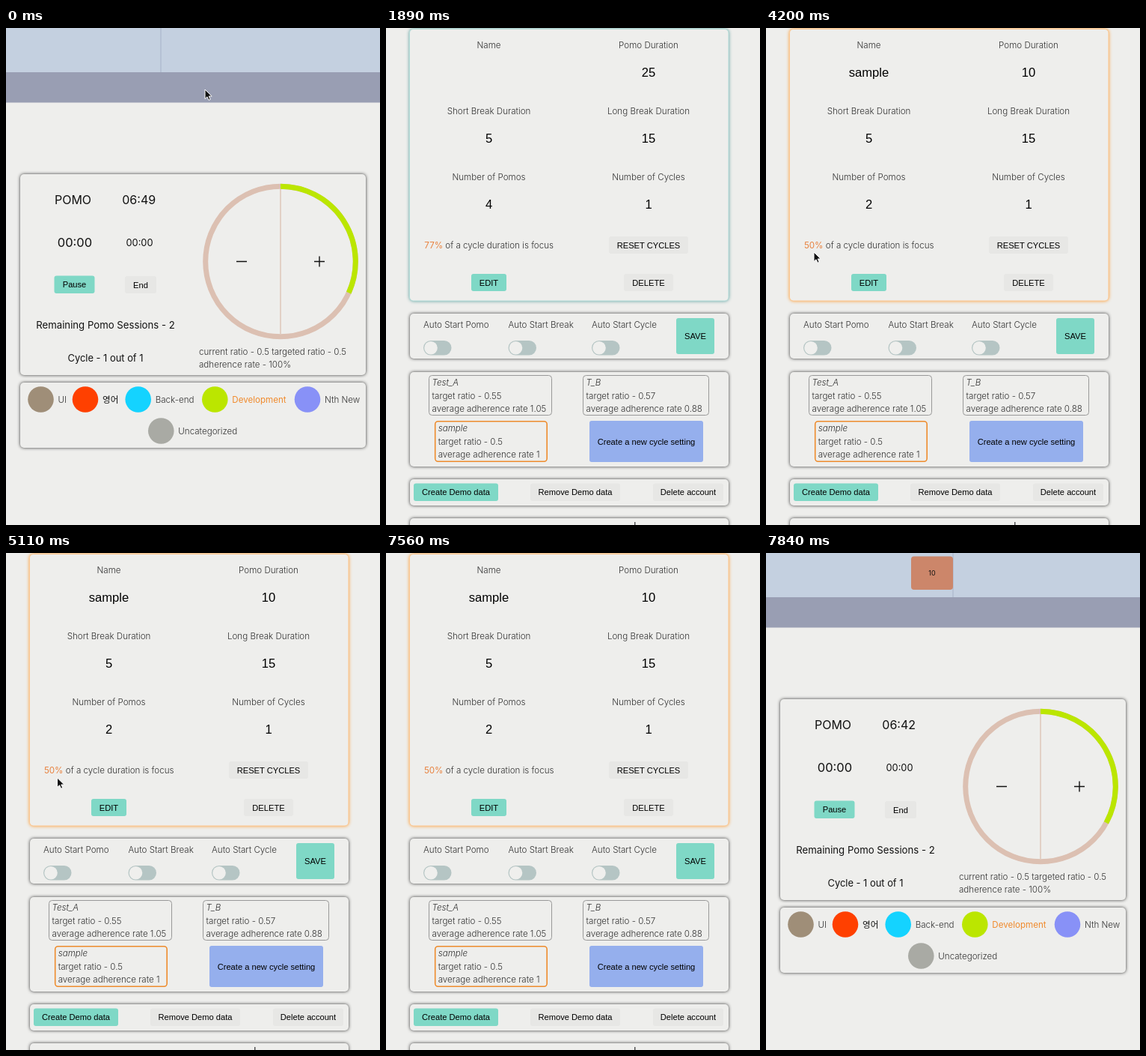
These frames come from a looping animation (500x663 px, 8000 ms). An HTML page:

```html
<!DOCTYPE html>
<html lang="en">
<head>
<meta charset="utf-8">
<title>Pomodoro timer</title>
<style>
  html, body { margin: 0; width: 100%; height: 100%; overflow: hidden; background: #eeeeec; }
  svg { display: block; width: 100%; height: 100%; }
  text { font-family: Inter, "Noto Sans CJK KR", sans-serif; font-weight: 300; fill: #333; white-space: pre; }
  .bold { font-weight: 400; fill: #111; }
  .ui { font-family: "Liberation Sans", Arial, sans-serif; font-weight: 400; fill: #000; }
  .name { font-style: italic; }
  .accent { font-weight: 400; fill: #f08a2c; }
  .share { font-weight: 400; fill: #e8823f; }
  .card { fill: #eeeeec; filter: drop-shadow(0 0 2px #333); }
  .fresh { stroke: #b4dcd8; filter: drop-shadow(0 0 2px #5f9f9f); }
  .loaded { stroke: #fbc894; filter: drop-shadow(0 0 2px #fba23f); }
  .box { fill: none; stroke: #999; }
  .chosen { stroke: #ee8c2d; stroke-width: 1.6; }
</style>
</head>
<body>
<svg id="stage" viewBox="0 0 500 663" preserveAspectRatio="none">
  <g id="home"></g>
  <g id="settings"></g>
  <path id="cursor" d="M0 0V12.5L3 9.8L5 14.3L7.2 13.3L5.2 9H9.2Z" fill="#111" stroke="#fff" stroke-width="1"/>
</svg>
<script>
const LOOP = 8000, TICK = 70;
const TEAL = '#7fd8c6', PALE = '#e7e7e5';
const $ = id => document.getElementById(id);

// y is the vertical middle of the capitals
const text = (x, y, str, { size = 11.6, cls = '', anchor = 'middle', id = '' } = {}) =>
  `<text id="${id}" class="${cls}" x="${x}" y="${y + size * 0.36}" font-size="${size}" text-anchor="${anchor}">${str}</text>`;
const left = (x, y, str, cls = '') => text(x, y, str, { cls, anchor: 'start' });
const bold = (x, y, str, size, id) => text(x, y, str, { size, id, cls: 'bold' });
const rect = (x0, y0, x1, y1, attrs, r = 4) =>
  `<rect x="${x0}" y="${y0}" width="${x1 - x0}" height="${y1 - y0}" rx="${r}" ${attrs}/>`;
const card = (x0, y0, x1, y1, id = '') => rect(x0, y0, x1, y1, `class="card" id="${id}"`, 5);
const button = (x0, y0, x1, y1, label, fill = PALE) =>
  rect(x0, y0, x1, y1, `fill="${fill}"`, 3) +
  text((x0 + x1) / 2, (y0 + y1) / 2, label, { size: 11.15, cls: 'ui' });
const line = (d, color, width) => `<path d="${d}" fill="none" stroke="${color}" stroke-width="${width}"/>`;
const tag = (x, y, color, label, cls) =>
  `<circle cx="${x}" cy="${y}" r="17.3" fill="${color}"/>` + left(x + 23, y, label, cls);
const field = (x, y, label, id) =>
  text(x, y, label) + text(x, y + 36.5, '', { size: 16.6, cls: 'ui', id });
const toggle = (x, label) => left(x, 395.5, label) +
  rect(x, 417, x + 37.5, 436.5, 'fill="#b5c5c4"', 9.75) +
  `<circle cx="${x + 10}" cy="426.7" r="8.8" fill="#efefed"/>`;
const cycle = (x0, y0, x1, y1, rows, cls = '') =>
  rect(x0, y0, x1, y1, `class="box ${cls}"`) +
  rows.map((row, i) => left(x0 + 4, y0 + 9.5 + i * 17.4, row, i ? '' : 'name')).join('');

$('home').innerHTML =
  rect(0, 0, 500, 59, 'fill="#c4d0e0"', 0) +
  rect(0, 59, 500, 99.5, 'fill="#999eb3"', 0) +
  `<path id="now" d="M0 0V59" stroke="#a7b2c8"/>` +
  `<g id="session">${rect(194, 4.5, 250, 49, 'fill="#cc866a"')}${bold(222, 27, '10', 9)}</g>` +
  card(19, 195, 481, 463) + card(19, 473, 481, 560) +
  bold(89.5, 229, 'POMO', 16) + bold(177.7, 229, '', 16, 'clock') +
  bold(92, 286, '00:00', 16.5) + bold(178.5, 286, '00:00', 12.8) +
  button(64.5, 330.5, 118.5, 354, 'Pause', TEAL) + button(159, 331, 201, 354, 'End') +
  bold(133, 396.5, 'Remaining Pomo Sessions - 2', 13.2) +
  bold(133, 440, 'Cycle - 1 out of 1', 12.9) +
  '<circle cx="367" cy="311.5" r="100.3" fill="none" stroke="#dcc0b2" stroke-width="7"/>' +
  line('M367 215V408', '#dcc0b2', 1.3) +
  '<path id="arc" fill="none" stroke="#bbe600" stroke-width="7"/>' +
  line('M308 311.5H322M412 311.5H426M419 304.5V318.5', '#111', 1.4) +
  left(258, 431.5, 'current ratio - 0.5 targeted ratio - 0.5') +
  left(258, 449, 'adherence rate - 100%') +
  tag(46.5, 495.5, '#9f8e78', 'UI') + tag(106, 495.5, '#ff4000', '영어', 'bold') +
  tag(176.7, 495.5, '#14d3ff', 'Back-end') + tag(279.3, 495.5, '#bbe600', 'Development', 'accent') +
  tag(403, 495.5, '#8891f7', 'Nth New') + tag(207.3, 537.5, '#a9aaa4', 'Uncategorized');

$('settings').innerHTML =
  card(31.5, 1.5, 458, 364, 'panel') +
  field(137.5, 23, 'Name', 'title') + field(351, 23, 'Pomo Duration', 'pomo') +
  field(137.5, 111, 'Short Break Duration', 'short') + field(351, 111, 'Long Break Duration', 'long') +
  field(137.5, 198.5, 'Number of Pomos', 'pomos') + field(351, 198.5, 'Number of Cycles', 'cycles') +
  text(137.7, 289.5, '<tspan id="share" class="share"></tspan> of a cycle duration is focus') +
  button(298, 278, 404, 301, 'RESET CYCLES') +
  button(114, 328, 161, 351, 'EDIT', TEAL) + button(318, 328, 384, 351, 'DELETE') +
  card(32, 381, 458, 441) +
  toggle(50, 'Auto Start Pomo') + toggle(163.5, 'Auto Start Break') + toggle(275, 'Auto Start Cycle') +
  button(388, 387, 439, 435, 'SAVE', TEAL) +
  card(32, 459, 458, 585) +
  cycle(57.5, 463.5, 221.5, 516.5, ['Test_A', 'target ratio - 0.55', 'average adherence rate 1.05']) +
  cycle(263.5, 463.5, 431.5, 516.5, ['T_B', 'target ratio - 0.57', 'average adherence rate 0.88']) +
  cycle(65.7, 524.7, 215.2, 578.3, ['sample', 'target ratio - 0.5', 'average adherence rate 1'], 'chosen') +
  button(272, 524, 424, 579, 'Create a new cycle setting', '#95afed') +
  card(32, 602, 458, 637) +
  button(37, 607.5, 150, 631, 'Create Demo data', TEAL) +
  button(193, 607.5, 313, 631, 'Remove Demo data') + button(357, 607.5, 451, 631, 'Delete account') +
  card(32, 654, 458, 690) + rect(332, 659, 333.5, 663, 'fill="#555"', 0);

const FIELDS = ['title', 'pomo', 'short', 'long', 'pomos', 'cycles', 'share'];
const DEFAULTS = ['', 25, 5, 15, 4, 1, '77%'];
const SAMPLE = ['sample', 10, 5, 15, 2, 1, '50%'];

// Each run lists time, x, y; the pointer is hidden between runs
const POINTER_RUNS = [
  [[0, 266, 82], [490, 266, 82], [910, 500, 50]],
  [[2940, 476, 110], [3150, 215, 302], [3640, 215, 302], [3920, 42, 302], [4200, 64, 299],
   [4620, 215, 300], [4690, 215, 300], [5180, 60, 300], [5670, 47, 304]]
];

function pointerAt(t) {
  const run = POINTER_RUNS.find(r => t >= r[0][0] && t < r[r.length - 1][0]);
  if (!run) return null;
  const i = run.findIndex(p => p[0] > t);
  const [t0, x0, y0] = run[i - 1], [t1, x1, y1] = run[i];
  const k = (t - t0) / (t1 - t0), e = k * k * (3 - 2 * k);
  return [x0 + (x1 - x0) * e, y0 + (y1 - y0) * e];
}

function drawTimer(t) {
  const remaining = t < 910 ? 409 : t < 1890 ? 408 : 402;
  $('clock').textContent = `0${Math.floor(remaining / 60)}:${String(remaining % 60).padStart(2, '0')}`;
  const a = (1 - remaining / 600) * 2 * Math.PI, r = 100.3;
  $('arc').setAttribute('d', `M367 ${311.5 - r}A${r} ${r} 0 0 1 ${367 + r * Math.sin(a)} ${311.5 - r * Math.cos(a)}`);
  $('now').setAttribute('transform', `translate(${t < 1890 ? 207 : 250} 0)`);
  $('session').style.display = t >= 7840 ? '' : 'none';
}

function drawSettings(t) {
  const loaded = t >= 1960;
  $('panel').setAttribute('class', `card ${loaded ? 'loaded' : 'fresh'}`);
  FIELDS.forEach((id, i) => $(id).textContent = (loaded ? SAMPLE : DEFAULTS)[i]);
}

function frame() {
  const t = Math.floor((performance.now() % LOOP) / TICK) * TICK;
  const onSettings = t >= 1890 && t < 7630;
  $('home').style.display = onSettings ? 'none' : '';
  $('settings').style.display = onSettings ? '' : 'none';
  (onSettings ? drawSettings : drawTimer)(t);
  const p = pointerAt(t);
  $('cursor').style.display = p ? '' : 'none';
  if (p) $('cursor').setAttribute('transform', `translate(${p[0]} ${p[1]})`);
  requestAnimationFrame(frame);
}
frame();
</script>
</body>
</html>
```
